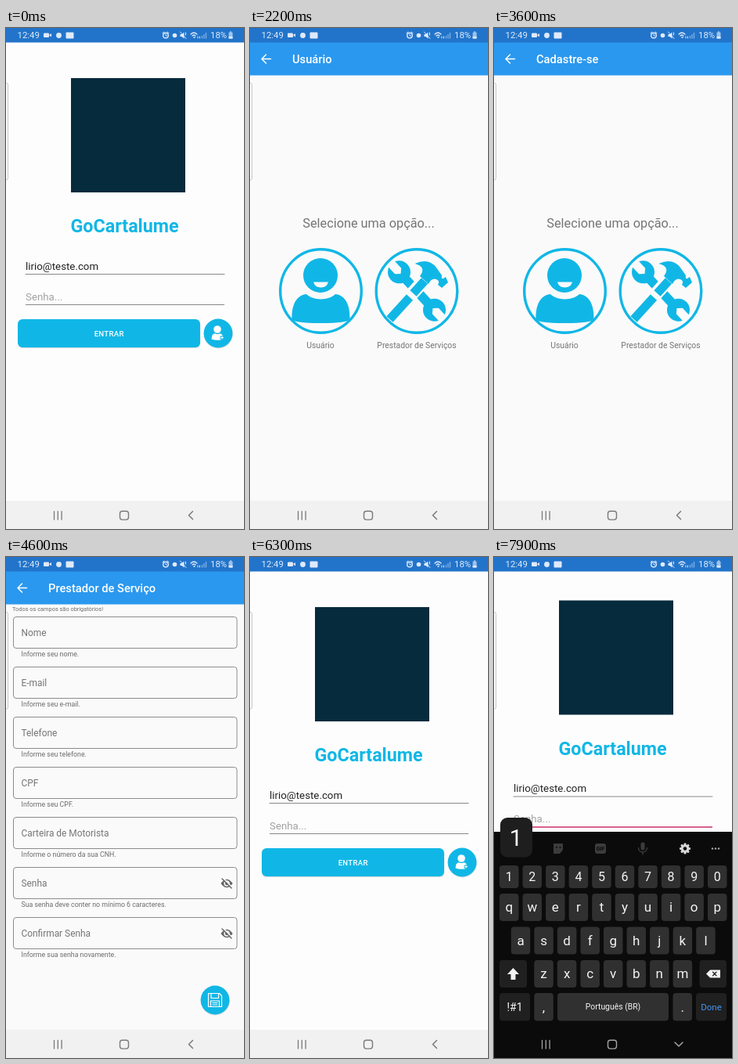
Write an HTML page that moves like this. It is 304 px wide and 640 px high and loops after 8000 ms.

```html
<!DOCTYPE html>
<html lang="pt-BR">
<head>
<meta charset="utf-8">
<style>
html, body { margin: 0; width: 100%; height: 100%; overflow: hidden; background: #fafafa; }
svg { display: block; width: 100vw; height: 100vh; font-family: Roboto, sans-serif; }
.line { fill: none; stroke-linecap: round; stroke-linejoin: round; }
.mid { text-anchor: middle; }
</style>
</head>
<body>
<svg id="stage" viewBox="0 0 304 640"></svg>
<script>
const CYAN = '#10b7e6', GRAY = '#757575', PAPER = '#fafafa';
const stage = document.getElementById('stage');

const text = (x, y, size, fill, s, more = '') =>
  `<text x="${x}" y="${y}" font-size="${size}" fill="${fill}" ${more}>${s}</text>`;
const mid = (x, y, size, fill, s, more = '') => text(x, y, size, fill, s, 'class="mid" ' + more);
const box = (x, y, w, h, fill, r = 0, more = '') =>
  `<rect x="${x}" y="${y}" width="${w}" height="${h}" rx="${r}" fill="${fill}" ${more}/>`;
const dot = (x, y, r, fill) => `<circle cx="${x}" cy="${y}" r="${r}" fill="${fill}"/>`;
const line = (d, stroke, w = 1, more = '') =>
  `<path class="line" d="${d}" stroke="${stroke}" stroke-width="${w}" ${more}/>`;
const shape = (d, fill) => `<path d="${d}" fill="${fill}"/>`;
const group = (id, s) => `<g id="${id}">${s}</g>`;
const fab = (x, y) => dot(x + .3, y + .8, 18.6, '#0002') + dot(x, y, 18.4, CYAN);

function login() {
  return box(0, 0, 304, 660, '#fdfdfd') +
    box(83, 64, 146, 146, '#052b3d') +
    mid(151.5, 261, 23.3, CYAN, 'GoCartalume', 'font-weight="700"') +
    text(25, 308.5, 13.3, '#222', 'lirio@teste.com') +
    line('M25 314.5H279', '#888') +
    text(25, 347.5, 13.3, '#a2a2a2', 'Senha...') +
    `<path id="under" d="M25 353.5H279"/>` +
    `<path id="caret" d="M26 333V351.5" stroke="#c2185b" stroke-width="1.4"/>` +
    box(15.3, 373, 233, 36, '#0002', 6) + box(15, 372, 233, 36, CYAN, 6) +
    mid(131.7, 394, 9.6, '#fff', 'ENTRAR', 'font-weight="500" letter-spacing=".3"') +
    fab(271, 390) +
    dot(270, 385, 4.8, '#fff') +
    shape('M262.5 397.5Q262.5 390.5 267 390.2Q270 392 273 390.2Q277.5 390.5 277.5 397.5Q270 400 262.5 397.5z', '#fff') +
    dot(276, 395.5, 2.6, CYAN) + line('M274.5 395.5h3M276 394v3', '#fff', 1.1);
}

function ring(x) {
  return `<ellipse cx="${x}" cy="336" rx="51.8" ry="53.3" fill="none" stroke="${CYAN}" stroke-width="3.4"/>`;
}

function wrench() {
  const end = a => `<g transform="rotate(${a}) translate(0 -33)">` +
    dot(0, 0, 14.5, CYAN) + shape('M-5.5 -16V-2L0 3L5.5 -2V-16z', PAPER) + '</g>';
  return `<g transform="translate(213 336) rotate(-43)">` +
    box(-6, -28, 12, 56, CYAN) + end(0) + end(180) + '</g>';
}

function hammer() {
  return line('M183 366L221 324', PAPER, 17, 'style="stroke-linecap:butt"') +
    line('M178.5 372L204 344M208.5 339L223 323', CYAN, 11, 'style="stroke-linecap:butt"') +
    shape('M210.5 301Q228 293 238 306L245 316Q244 321 247 320L250 318L253 325L245 332L240 328Q243 323 238 321Q232 319 228 327L217 317Q226 305 210.5 301z', CYAN);
}

function select() {
  return box(0, 60, 304, 545, PAPER) +
    mid(151.5, 255, 16.3, GRAY, 'Selecione uma opção...') +
    ring(90.5) + ring(213) +
    dot(90, 316, 22, CYAN) +
    shape('M81 324.5H100Q98 331.5 90.5 331.5Q83 331.5 81 324.5z', PAPER) +
    shape('M53.5 372C53 351 61 341 72 340C81 348.5 100 348.5 109 340C120 341 128 351 127.5 372Q125 377 90 377Q56 377 53.5 372z', CYAN) +
    wrench() + hammer() +
    mid(90, 409, 10.4, GRAY, 'Usuário') +
    mid(213, 409, 10.4, GRAY, 'Prestador de Serviços');
}

const eye = y => `<g transform="translate(282 ${y})">` +
  shape('M-7.6 0Q0 -10.5 7.6 0Q0 10.5 -7.6 0z', '#666') +
  dot(0, 0, 3.7, PAPER) + dot(0, 0, 2.2, '#666') +
  line('M-5 -7L7 5', PAPER, 1.6) + line('M-6 -6L6 6', '#666', 1.4) + '</g>';

const FIELDS = [
  ['Nome', 'Informe seu nome.'],
  ['E-mail', 'Informe seu e-mail.'],
  ['Telefone', 'Informe seu telefone.'],
  ['CPF', 'Informe seu CPF.'],
  ['Carteira de Motorista', 'Informe o número da sua CNH.'],
  ['Senha', 'Sua senha deve conter no mínimo 6 caracteres.'],
  ['Confirmar Senha', 'Informe sua senha novamente.']
];

function form(fields) {
  const rows = fields.map(([label, help], i) => {
    const y = 76.5 + 64 * i;
    return box(9.5, y, 285.5, 40, 'none', 3.5, 'stroke="#8c8c8c"') +
      text(19.5, y + 24.7, 11.9, GRAY, label) +
      text(19.5, y + 50.2, 8.8, '#6c6c6c', help) +
      (label.includes('Senha') ? eye(y + 20.5) : '');
  });
  return box(0, 60, 304, 545, PAPER) +
    text(8, 69, 7.4, '#6c6c6c', 'Todos os campos são obrigatórios!') + rows.join('') +
    fab(267, 566) +
    line('M258.5 557.5H272.5L275.5 560.5V574.5H258.5zM262 557.5V563.5H271.5V557.5M261.5 574.5V567H272.5V574.5M264 569.5H270M264 572H270', '#fff', 1.2);
}

function status() {
  const c = '#dfeafa';
  return box(0, 0, 304, 18.5, '#2274ca') + text(14.5, 13.3, 11.4, c, '12:49') +
    box(48, 6.5, 7, 5.5, c, 1) + shape('M55 9L58 7V11.5z', c) +
    dot(67.5, 9.5, 3.4, c) + box(76.5, 5.5, 10, 8, c, 1) +
    `<circle cx="204" cy="9.5" r="3.3" fill="none" stroke="${c}" stroke-width="1.4"/>` +
    line('M204 8V10H205.5M200 6.5L202 5M208 6.5L206 5', c) +
    dot(215.5, 9.5, 2.8, c) +
    shape('M222.5 8H224.5L227.5 5.5V13.5L224.5 11H222.5z', c) +
    line('M222.5 5L230 13.5M229.5 6V9', c) +
    line('M236 8Q240 4 244 8M238 10Q240 8 242 10', c, 1.2) + dot(240.5, 12, 1.1, c) +
    line('M245 11V13M247.5 13V11', c) +
    line('M250.5 13V10.5M253 13V8.5M255.5 13V6.5', '#7fb0e6', 1.3) +
    text(261, 13.3, 11.4, c, '18%') +
    box(284.5, 5.5, 5, 8, '#9cc2ee', .8) + box(286, 4.5, 2, 1, c) + box(284.5, 11, 5, 2.5, c);
}

function key(x, y, w, h, label, size = 17, fill = '#303030', ink = '#f4f4f4') {
  return box(x, y, w, h, fill, 4) + mid(x + w / 2, y + h / 2 + size * .34, size, ink, label);
}
const keyRow = (letters, x, y, h, size) =>
  [...letters].map((k, i) => key(x + 29.55 * i, y, 24.5, h, k, size)).join('');

function keyboard() {
  const dim = '#3c3c3c', lit = '#d8d8d8', teeth = [0, 45, 90, 135]
    .map(a => box(-1.5, -7, 3, 14, lit, 1, `transform="rotate(${a})"`)).join('');
  return box(0, 351, 304, 320, '#0b0b0b') +
    shape('M76 366H88V374L84 379H76z', dim) + dot(80, 371, 1, '#0b0b0b') + dot(84.5, 371, 1, '#0b0b0b') +
    box(129, 366, 14, 13, dim, 3) + mid(136, 375.2, 7, '#0b0b0b', 'GIF', 'font-weight="700"') +
    box(187.5, 364.5, 5, 10, dim, 2.5) + line('M184.5 371.5Q185 377 190 377Q195 377 195.5 371.5M190 377V380', dim, 1.4) +
    `<g transform="translate(244 372.5)">${teeth}${dot(0, 0, 5.3, lit)}${dot(0, 0, 2.3, '#0b0b0b')}</g>` +
    [279, 283, 287].map(x => dot(x, 372.5, 1.2, '#a8a8a8')).join('') +
    keyRow('1234567890', 7, 394, 29, 16) +
    keyRow('qwertyuiop', 7, 430, 35, 17) +
    keyRow('asdfghjkl', 21.8, 472.5, 35, 17) +
    keyRow('zxcvbnm', 51.3, 515, 35, 17) +
    key(7, 515, 35, 35, '', 1, '#202020') + shape('M24.5 525L32 533H27.5V540H21.5V533H17z', '#f4f4f4') +
    key(262.5, 515, 34.5, 35, '', 1, '#202020') +
    shape('M271 532.5L276 527.5H289V537.5H276z', '#f4f4f4') +
    line('M279.5 530.3L284 534.8M284 530.3L279.5 534.8', '#202020', 1.3) +
    key(7, 557, 39, 35.5, '!#1', 14, '#202020') + key(51.3, 557, 24.5, 35.5, ',') +
    key(81, 557, 142, 35.5, 'Português (BR)', 10.4) + key(228.5, 557, 24.5, 35.5, '.') +
    key(258, 557, 39, 35.5, 'Done', 11.5, '#202020', '#4596f0') +
    group('popup', box(8, 333, 41, 50.5, '#1e1e1e', 9) + mid(28, 369, 29.5, '#fff', '1'));
}

const nav = () =>
  line('M61.5 617.5V628M66.3 617.5V628M71.1 617.5V628', 'inherit', 1.3) +
  box(145.5, 617.3, 11, 10.8, 'none', 3, 'stroke-width="1.4"') +
  '<path id="chevron" class="line" stroke-width="1.5"/>';

stage.innerHTML =
  box(0, 0, 304, 640, PAPER) +
  group('login', login()) + group('select', select()) +
  group('user', form(FIELDS.filter(f => f[0] !== 'Carteira de Motorista'))) +
  group('provider', form(FIELDS)) +
  group('header', box(0, 18, 304, 42.5, '#2a98ef') +
    line('M26.5 39.5H15.5M20.5 34L15 39.5L20.5 45', '#fff', 1.5) +
    '<text id="title" x="54" y="45" font-size="14.7" font-weight="500" fill="#fff"></text>') +
  box(-6, 70.5, 8.5, 123.5, '#fff', 2, 'stroke="#c4c4c4"') +
  status() + box(0, 604, 304, 36, '#f1f1f1') +
  group('keys', keyboard()) + group('nav', nav());

const $ = Object.fromEntries([...stage.querySelectorAll('[id]')].map(e => [e.id, e]));
const TITLES = { login: '', select: 'Cadastre-se', user: 'Usuário', provider: 'Prestador de Serviço' };

// Header swaps at the first time; the body cross-fades between the other two.
const VISITS = [
  ['login', -2, -1, 0],
  ['select', 1150, 1250, 1550],
  ['user', 2150, 2280, 2580],
  ['select', 3050, 3120, 3450],
  ['provider', 3880, 3980, 4300],
  ['select', 4750, 4850, 5200],
  ['login', 5850, 5920, 6250]
];
const FOCUS = 6950;

const ease = (t, a, b) => {
  const p = Math.min(1, Math.max(0, (t - a) / (b - a)));
  return p * p * (3 - 2 * p);
};
const show = (el, on) => el.setAttribute('opacity', +on);

function draw(t) {
  const n = VISITS.findLastIndex(v => t >= v[1]);
  const [page, , a, b] = VISITS[n], p = ease(t, a, b);
  for (const id in TITLES) {
    show($[id], id === page ? p : n && id === VISITS[n - 1][0] ? 1 - p : 0);
  }
  show($.header, page !== 'login');
  $.title.textContent = TITLES[page];

  const focused = t >= FOCUS;
  $.under.setAttribute('stroke', focused ? '#cc2c6c' : '#888');
  $.under.setAttribute('stroke-width', focused ? 1.6 : 1);
  show($.caret, focused && (t - FOCUS) % 1000 < 500);
  $.login.setAttribute('transform', `translate(0 ${-8.5 * ease(t, 7000, 7400)})`);

  $.keys.setAttribute('transform', `translate(0 ${290 * (1 - ease(t, 7085, 7400))})`);
  show($.popup, t >= 7800);
  $.nav.setAttribute('stroke', focused ? '#a4a4a4' : '#7a7a7a');
  $.chevron.setAttribute('d', focused ? 'M231 620L236 625L241 620' : 'M238.5 617.5L233.5 622.5L238.5 627.5');
}

function tick() {
  draw(performance.now() % 8000);
  requestAnimationFrame(tick);
}
tick();
</script>
</body>
</html>
```
